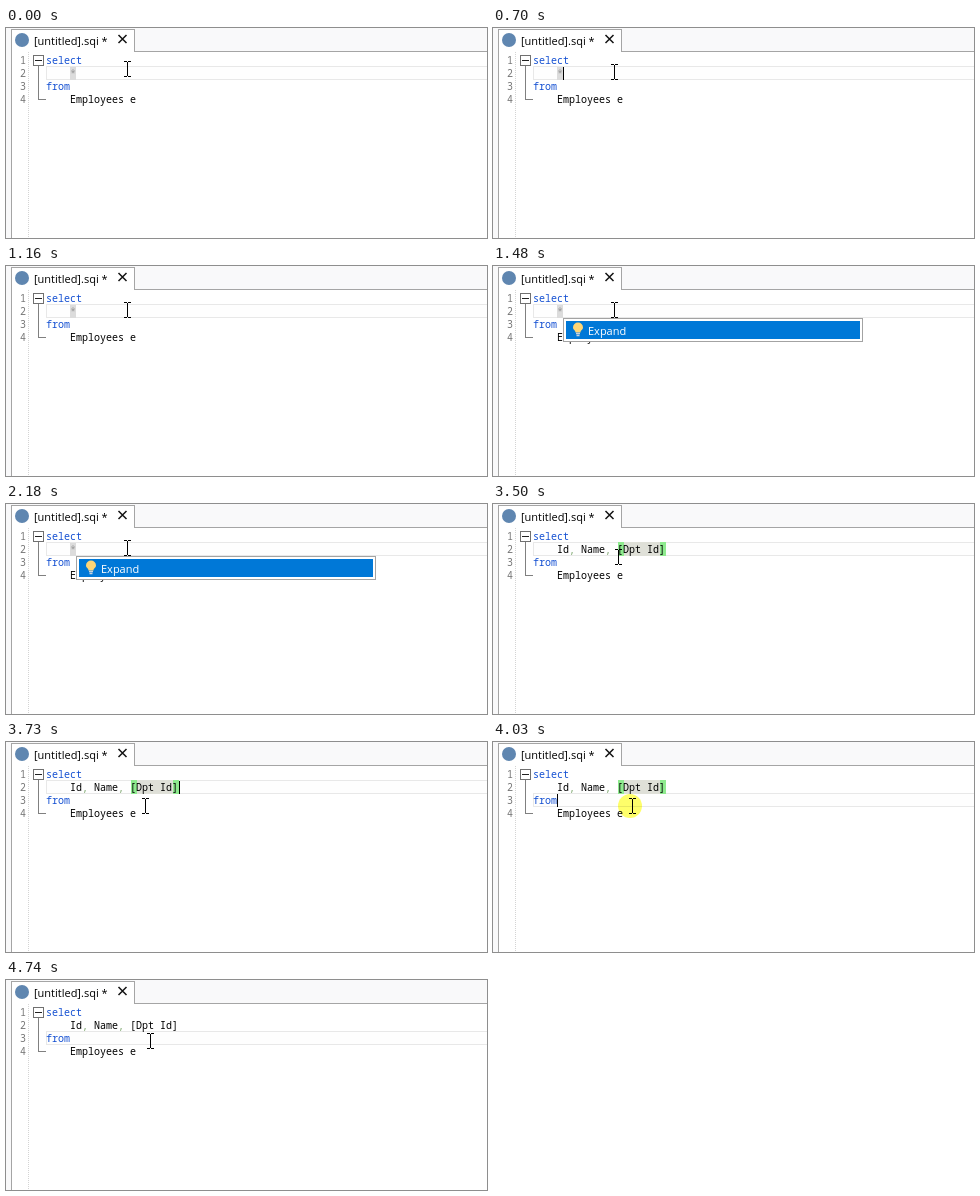
An HTML page for the animation above (5.04 s loop, 481x210 px).

```html
<!DOCTYPE html>
<html lang="en">
<head>
<meta charset="utf-8">
<title>Expand the asterisk</title>
<style>
  html, body { margin: 0; width: 100%; height: 100%; overflow: hidden; background: #f9f9fa; }
  svg { display: block; width: 100%; height: 100%; }
  text { white-space: pre; }
  .code { font: 10px "Noto Sans Mono", "DejaVu Sans Mono", monospace; fill: #000; }
  .ui { font: 11px "Open Sans", "Noto Sans", sans-serif; }
  .code .key { fill: #1450d2; }
  .code .op { fill: #86ad78; }
  .code .star { fill: #999; }
  .num { fill: #777; text-anchor: end; }
  .crisp { shape-rendering: crispEdges; }
  #click { fill: #ffff37; opacity: .75; mix-blend-mode: multiply; }
</style>
</head>
<body>
<svg viewBox="0 0 481 210">
  <g class="crisp">
    <path d="M5 1H128V23H481V210H5Z" fill="#fff"/>
    <path d="M5.5 210V1.5H128.5V23.5H481" fill="none" stroke="#a5a5a5"/>
    <path d="M22.5 24V210" stroke="#d4d4d4" stroke-dasharray="1 1"/>
    <rect id="band" x="40.5" y=".5" width="445" height="13" fill="#fefefe" stroke="#e8e8e8"/>
    <path d="M32.5 38V71.5H40" fill="none" stroke="#808080"/>
    <rect x="27.5" y="27.5" width="10" height="10" fill="#fff" stroke="#707070"/>
    <path d="M29 32.5H36" stroke="#222"/>
    <rect id="starBox" x="64" y="39" width="6" height="13" fill="#dcdcdc"/>
    <rect id="freshBox" x="64" y="38" width="109" height="14" fill="#e0e6d2"/>
    <g id="brackets">
      <rect x="125" y="38" width="48" height="14" fill="#dfe0d8"/>
      <path d="M125 38h6v14h-6zM167 38h6v14h-6z" fill="#8eea8e"/>
    </g>
  </g>

  <circle cx="16" cy="12" r="7" fill="#5f86b0"/>
  <text class="ui" x="28" y="17" fill="#000">[untitled].sqi *</text>
  <path d="M112.5 7l8 8m0-8l-8 8" stroke="#111" stroke-width="1.5"/>

  <g class="code">
    <text class="num" x="20" y="36">1</text>
    <text class="num" x="20" y="49">2</text>
    <text class="num" x="20" y="62">3</text>
    <text class="num" x="20" y="75">4</text>
    <text class="key" x="40" y="36">select</text>
    <text class="star" id="star" x="64" y="49">*</text>
    <text id="columns" x="64" y="49">Id<tspan class="op">,</tspan> Name<tspan class="op">,</tspan> [Dpt Id]</text>
    <text class="key" x="40" y="62">from</text>
    <text x="64" y="75">Employees e</text>
  </g>

  <g id="popup">
    <g class="crisp">
      <rect x="70.5" y="52.5" width="299" height="23" fill="#fff" stroke="#a3a3a3"/>
      <rect x="73" y="55" width="294" height="18" fill="#0078d7"/>
    </g>
    <path d="M82.5 66.5C82.5 64 80 64 80 61.5a5 5 0 0 1 10 0C90 64 87.5 64 87.5 66.5Z" fill="#ffd676"/>
    <path d="M83 67.5h4M83.5 69.5h3" stroke="#c9d3dd" stroke-width="1.4"/>
    <text class="ui" x="95" y="69" fill="#fff">Expand</text>
  </g>

  <rect id="caret" class="crisp" width="1" height="13"/>
  <circle id="click" cx="-2" r="12"/>
  <path id="pointer" class="crisp" fill="none" stroke="#000"
    d="M-3 -7.5H0M1 -7.5H4M.5 -7V7M-3 7.5H0M1 7.5H4"/>
</svg>
<script>
const LOOP = 5040, BLINK = 510, STEP = 75;
const FIRST_CLICK = 550, POPUP = 1480, EXPAND = 2330, SETTLE = 2560;
const SWEEP = 3500, SECOND_CLICK = 3880, DRIFT = 4030, UNMATCH = 4180;
const REFOCUS = SECOND_CLICK + STEP;

const el = id => document.getElementById(id);
const show = (id, on) => el(id).style.display = on ? "" : "none";
const move = (id, x, y) => el(id).setAttribute("transform", `translate(${x} ${y})`);
const during = (t, start, length) => t >= start && t < start + length;

// The screen refreshes in steps, so motion advances in jumps of STEP.
const stepped = (t, start, steps) =>
  Math.max(0, Math.min(1, Math.floor((t - start) / STEP) / steps));

function pointerAt(t) {
  if (t < SWEEP) return [121, t < 380 ? 41 : 44];
  const sweep = stepped(t, SWEEP, 3), drift = stepped(t, DRIFT, 3);
  const bulge = Math.sin(Math.PI * sweep);
  return [
    Math.round(125 + 14 * sweep + 52 * bulge + 5 * drift),
    Math.round(53 + 11 * sweep + 45 * bulge - 3 * drift)
  ];
}

function caretAt(t) {
  if (t < EXPAND) return { x: 70, start: 650 };
  if (t < REFOCUS) return { x: 173, start: 2530 };
  return { x: 64, start: 4230 };
}

function draw(t) {
  const expanded = t >= EXPAND;
  const lineTop = t < REFOCUS ? 39 : 52;
  move("band", 0, lineTop - 1);
  show("star", !expanded);
  show("starBox", !expanded);
  show("columns", expanded);
  show("freshBox", expanded && t < SETTLE);
  show("brackets", t >= SETTLE && t < UNMATCH);
  show("popup", t >= POPUP && !expanded);

  const caret = caretAt(t);
  const blinks = Math.floor(Math.max(0, t - caret.start) / BLINK);
  show("caret", t >= FIRST_CLICK + STEP && blinks % 2 === 0);
  move("caret", caret.x, lineTop);

  const [x, y] = pointerAt(t);
  move("pointer", x, y);
  move("click", x, y);
  show("click", during(t, FIRST_CLICK, 2 * STEP) || during(t, SECOND_CLICK, 3 * STEP));
}

function tick(now) {
  draw(now % LOOP);
  requestAnimationFrame(tick);
}
draw(0);
requestAnimationFrame(tick);
</script>
</body>
</html>
```
